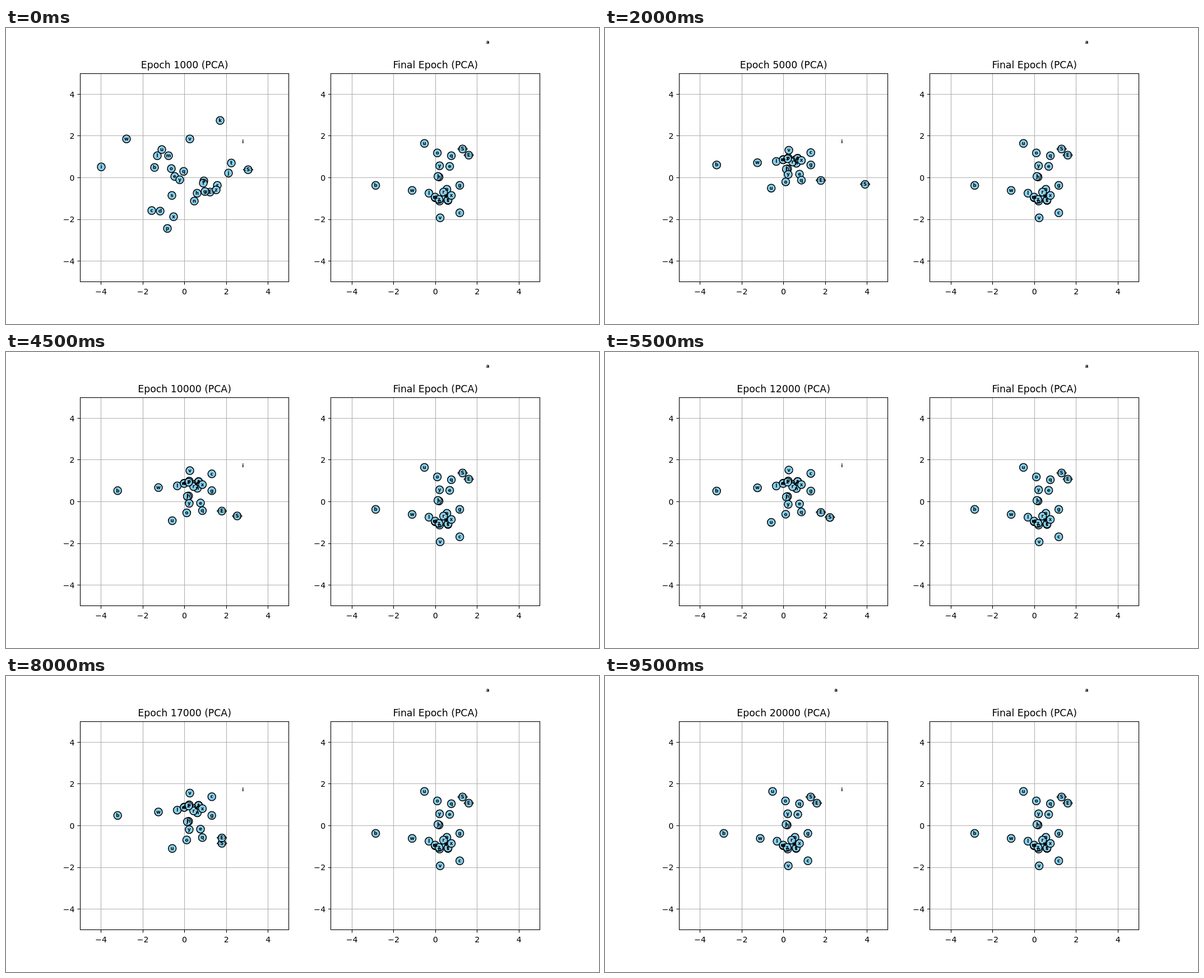
These frames come from a looping animation (1058 px wide and 529 px high, 10 s). An HTML page:

```html
<!DOCTYPE html>
<html lang="en">
<head>
<meta charset="utf-8">
<title>Embedding scatter</title>
<style>
  html, body { margin: 0; width: 100%; height: 100%; overflow: hidden; background: #fff; }
  svg { display: block; width: 1058px; height: 529px; }
  text { font-family: "DejaVu Sans", sans-serif; text-anchor: middle; }
  .title { font-size: 17.3px; }
  .tick { font-size: 14.1px; }
  .ytick { text-anchor: end; }
  .label { font-size: 8.5px; font-weight: bold; }
  .dot { fill: skyblue; stroke: #000; stroke-width: 1.5; }
  .grid { stroke: #b0b0b0; stroke-width: 1.11; }
  .axis { stroke: #000; stroke-width: 1.11; fill: none; }
</style>
</head>
<body>
<svg id="stage" viewBox="0 0 1058 529"></svg>
<script>
const STEP = 500, EPOCHS = 20, FLIP = 18;
const SIZE = 372.7, UNIT = SIZE / 10, TOP = 81.15, LEFT = 132.25, SHIFT = 447.6;
const MID_X = LEFT + SIZE / 2, MID_Y = TOP + SIZE / 2;
const stage = document.getElementById('stage');

// Each token has two key points: where it starts and where training ends.
const token = (label, startX, startY, endX, endY, drift = 0) =>
  ({ label, startX, startY, endX, endY, drift });

const tokens = [
  token('<S>', 432, 253, 367, 216, 210),
  token('<E>', 364, 293, 378, 227),
  token('a', 353, 273, 412, 25),
  token('b', 265, 249, 212, 281),
  token('c', 260, 326, 362, 330),
  token('d', 275, 327, 318, 303),
  token('e', 301, 265, 344, 247),
  token('f', 352, 277, 339, 300),
  token('g', 355, 292, 362, 281),
  token('h', 341, 295, 325, 266),
  token('i', 170, 248, -25, 203),
  token('j', 397, 259, 323, 265),
  token('k', 382, 165, 337, 301),
  token('l', 270, 228, 307, 295),
  token('m', 290, 228, 318, 302),
  token('n', 336, 309, 339, 288),
  token('o', 295, 251, 322, 223),
  token('p', 288, 358, 326, 309),
  token('q', 317, 256, 347, 228),
  token('r', 377, 281, 333, 293),
  token('s', 296, 299, 341, 308),
  token('t', 402, 241, 341, 307),
  token('u', 278, 217, 299, 206),
  token('v', 328, 198, 327, 339),
  token('w', 215, 198, 277, 290),
  token('x', 299, 337, 347, 299),
  token('y', 310, 271, 326, 246),
  token('z', 375, 289, 325, 306)
];

// Tokens settle into a mirror image of the final layout, which flips upright near the end.
function positionAt({ startX, startY, endX, endY, drift }, epoch) {
  const spread = Math.min(1.12, 1 + 0.04 * (EPOCHS - epoch));
  const wideX = MID_X + (endX - MID_X) * spread;
  if (epoch >= FLIP) return [wideX, endY];
  const rise = 300 - endY;
  const stretch = 0.7 * (1 - Math.exp(-epoch / 5));
  const mirrorX = wideX + drift * Math.exp(-epoch / 6);
  const mirrorY = 236 + stretch * rise + 1e-5 * rise ** 3;
  const rest = Math.exp(-2 * (epoch - 1));
  return [mirrorX + (startX - mirrorX) * rest, mirrorY + (startY - mirrorY) * rest];
}

function add(parent, name, attrs, text) {
  const node = document.createElementNS('http://www.w3.org/2000/svg', name);
  for (const key in attrs) node.setAttribute(key, attrs[key]);
  if (text !== undefined) node.textContent = text;
  parent.append(node);
  return node;
}

const snap = value => Math.floor(value) + 0.5;

function buildPanel(left, caption) {
  const midX = left + SIZE / 2, right = left + SIZE, bottom = TOP + SIZE;
  const clip = 'clip' + Math.round(left);
  const box = {
    x: snap(left), y: snap(TOP),
    width: snap(right) - snap(left), height: snap(bottom) - snap(TOP)
  };
  add(add(stage, 'clipPath', { id: clip }), 'rect', box);
  const grid = add(stage, 'g', { class: 'grid' });
  const dots = add(stage, 'g', { 'clip-path': `url(#${clip})` });
  const axis = add(stage, 'g', { class: 'axis' });
  add(axis, 'rect', box);
  for (let value = -4; value <= 4; value += 2) {
    const x = midX + value * UNIT, y = MID_Y - value * UNIT;
    const name = String(value).replace('-', '\u2212');
    add(grid, 'path', { d: `M${snap(x)} ${TOP}V${bottom}M${left} ${snap(y)}H${right}` });
    add(axis, 'path', { d: `M${snap(x)} ${bottom}v4.9M${left} ${snap(y)}h-4.9` });
    add(stage, 'text', { class: 'tick', x, y: 476 }, name);
    add(stage, 'text', { class: 'tick ytick', x: left - 9.7, y: y + 5.3 }, name);
  }
  const title = add(stage, 'text', { class: 'title', x: midX, y: 72.3 }, caption);
  const labels = add(stage, 'g', { class: 'label' });
  const marks = tokens.map(item => ({
    item,
    dot: add(dots, 'circle', { class: 'dot', r: 7 }),
    text: add(labels, 'text', {}, item.label)
  }));
  const place = epoch => marks.forEach(({ item, dot, text }) => {
    const [x, y] = positionAt(item, epoch);
    dot.setAttribute('cx', x + left - LEFT);
    dot.setAttribute('cy', y + 0.3);
    text.setAttribute('x', x + left - LEFT);
    text.setAttribute('y', y + 3);
  });
  return { title, place };
}

const training = buildPanel(LEFT, '');
buildPanel(LEFT + SHIFT, 'Final Epoch (PCA)').place(EPOCHS);

let shown = 0;
function render(time) {
  const epoch = 1 + Math.floor(time / STEP) % EPOCHS;
  if (epoch === shown) return;
  shown = epoch;
  training.title.textContent = `Epoch ${epoch * 1000} (PCA)`;
  training.place(epoch);
}

const start = performance.now();
function tick() {
  render(performance.now() - start);
  requestAnimationFrame(tick);
}
tick();
</script>
</body>
</html>
```
